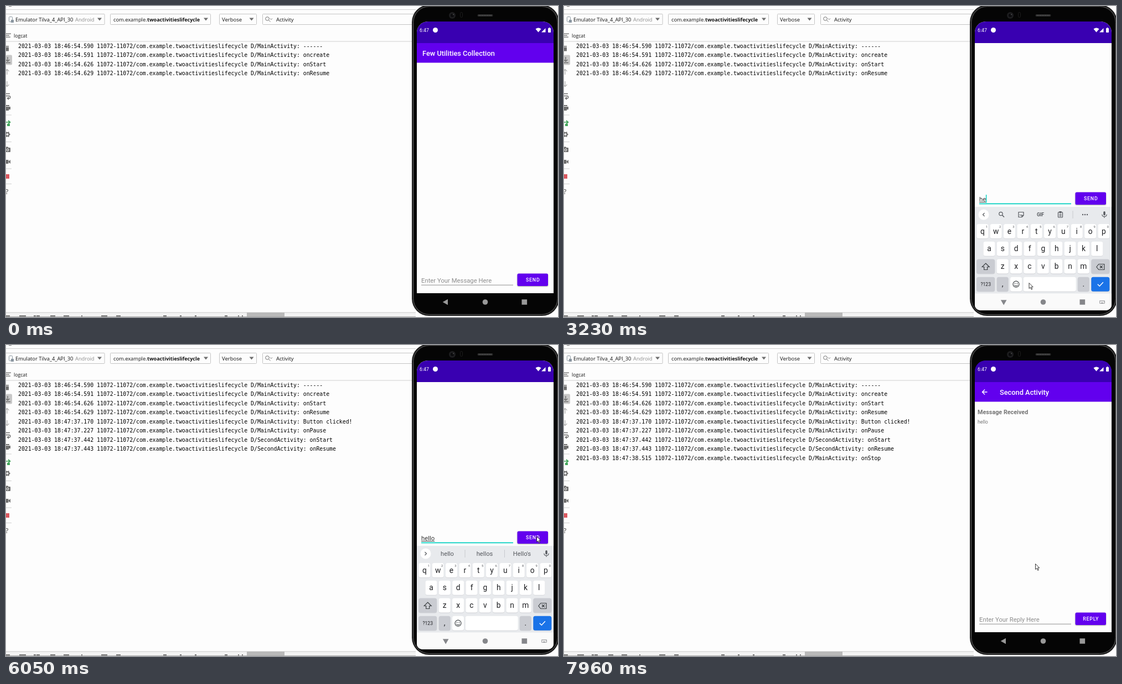
Animation, 997 px wide and 562 px high, one loop 8000 ms. Source, as an HTML page with a canvas:

```html
<!DOCTYPE html>
<html lang="en">
<head>
<meta charset="utf-8">
<title>Activity log and phone</title>
<style>
html, body { margin: 0; width: 100%; height: 100%; overflow: hidden; background: #fdfdfd; }
canvas { display: block; }
</style>
</head>
<body>
<canvas id="stage" width="997" height="562"></canvas>
<script>
const c = document.getElementById('stage').getContext('2d');
const LOOP = 8000, PI2 = Math.PI * 2;
const UI = '"Open Sans", sans-serif', MONO = '"DejaVu Sans Mono", monospace', APP = 'Roboto, sans-serif';
const PURPLE = '#6200ee', DARK = '#3900b1', TEAL = '#03d0c0', INK = '#6e6e6e';

// Value of the last step that has started: steps are [time, value].
const at = (t, first, steps) => steps.reduce((v, [s, next]) => t >= s ? next : v, first);

function rect(x, y, w, h, color, r = 0) {
  c.fillStyle = color;
  c.beginPath();
  c.roundRect(x, y, w, h, r);
  c.fill();
}
function box(x, y, w, h, color, r = 0, width = 1) {
  c.strokeStyle = color;
  c.lineWidth = width;
  c.beginPath();
  c.roundRect(x, y, w, h, r);
  c.stroke();
}
function disc(x, y, r, color) { rect(x - r, y - r, 2 * r, 2 * r, color, r); }
function ring(x, y, r, color, width = 1.2) { box(x - r, y - r, 2 * r, 2 * r, color, r, width); }
function shape(d, color, x = 0, y = 0, width = 0) {
  c.save();
  c.translate(x, y);
  const p = new Path2D(d);
  if (width) { c.strokeStyle = color; c.lineWidth = width; c.stroke(p); }
  else { c.fillStyle = color; c.fill(p); }
  c.restore();
}
function text(s, x, y, font, color = '#111', align = 'left', spacing = 0) {
  c.font = font;
  c.fillStyle = color;
  c.textAlign = align;
  c.letterSpacing = spacing + 'px';
  c.fillText(s, x, y);
  c.letterSpacing = '0px';
}
function clip(x, y, w, h, r, draw) {
  c.save();
  c.beginPath();
  c.roundRect(x, y, w, h, r);
  c.clip();
  draw();
  c.restore();
}

const LOG = [
  [0, '03-03 18:46:54.590', 'Main', '------'],
  [0, '03-03 18:46:54.591', 'Main', 'oncreate'],
  [0, '03-03 18:46:54.626', 'Main', 'onStart'],
  [0, '03-03 18:46:54.629', 'Main', 'onResume'],
  [5500, '03-03 18:47:37.170', 'Main', 'Button clicked!'],
  [5740, '03-03 18:47:37.227', 'Main', 'onPause'],
  [6050, '03-03 18:47:37.442', 'Second', 'onStart'],
  [6050, '03-03 18:47:37.443', 'Second', 'onResume'],
  [7030, '03-03 18:47:38.515', 'Main', 'onStop']
];

function desktop(t) {
  const font = '9.3px ' + UI;
  rect(0, 0, 997, 562, '#fdfdfd');
  rect(0, 6, 740, 1, '#d0d0d0');
  rect(5, 0, 5, 1, '#777');
  rect(0, 63.5, 740, 1, '#d0d0d0');
  for (const [x, w] of [[-3, 181], [188.5, 181], [385.5, 67], [463.5, 290]])
    box(x, 14.5, w, 19, '#c4c4c4', 1);
  for (const x of [169, 361, 443.5]) shape('M-4 -2H4L0 3Z', '#6e6e6e', x, 23.5);

  box(5.5, 19.5, 6, 9, '#8a96a0', 1);
  rect(9, 25, 5, 5, '#8a96a0');
  text('Emulator Tilva_4_API_30', 17, 27.5, font);
  text('Android', 125, 27.5, font, '#8c8c8c');
  text('com.example.', 194, 27.5, font);
  text('twoactivitieslifecycle', 255, 27.5, 'bold 9px ' + UI);
  text('Verbose', 390, 27.5, '9.5px ' + UI);
  ring(472, 23, 3.3, '#777', 1);
  shape('M474.5 25.5L477.5 28.5M477 22.5L479 24.5L481 22.5', '#777', 0, 0, 1);
  text('Activity', 488, 27.5, '9.5px ' + UI);
  for (const [y, w] of [[50, 9], [53, 6], [56, 8]]) rect(0, y - .5, w, 1.3, INK);
  text('logcat', 14, 57, '8.7px ' + UI);

  gutter();
  LOG.forEach(([start, stamp, name, message], i) => {
    if (t >= start) text(`2021-${stamp} 11072-11072/com.example.twoactivitieslifecycle D/${name}Activity: ${message}`,
      22, 76 + i * 16.47, '9.83px ' + MONO, '#000');
  });

  rect(0, 553.5, 740, 8.5, '#f3f3f3');
  rect(0, 553.5, 740, 1, '#c9c9c9');
  rect(435, 554, 68, 8, '#b9b9b9');
  for (const [x, w] of [[0, 7], [24, 12], [50, 4], [55, 6], [80, 9], [104, 10], [136, 2], [172, 11], [199, 8],
    [284, 6], [314, 3], [341, 3], [395, 5], [419, 2], [426, 2]]) rect(x, 559, w, 2, '#777');
  rect(0, 561, 740, 1, '#aaa');
}

function gutter() {
  rect(0, 72, 5, 1.5, INK);
  rect(0, 74.5, 5, 7, INK);
  rect(0, 88.5, 11, 18, '#c8c8c8', 2);
  shape('M3 92V100M-.5 97L3 100L6.5 97M-1 102.5H8', INK, 0, 0, 1.4);
  shape('M2 124V115M-1.5 118L2 114.5L5.5 118M2 136V145M-1.5 142L2 145.5L5.5 142', '#b5b5b5', 0, 0, 1.3);
  shape('M0 158.5H7M0 162.5H5.5C8.5 162.5 8.5 167 5.5 167H3M5 164.5L2.5 167L5 169', INK, 0, 0, 1.4);
  rect(0, 179, 6, 2, INK);
  rect(0, 182, 8, 5, INK);
  rect(0, 186, 5, 3, INK);
  for (const y of [196.5, 245, 293.5, 321]) rect(0, y, 10, 1, '#d0d0d0');
  shape('M0 210H6M4 207L7.5 210L4 213', '#42a55b', 0, 0, 1.7);
  rect(2, 213, 5, 4, '#42a55b');
  ring(2.5, 232, 3, INK, 2);
  for (let a = 0; a < 6; a++) disc(2.5 + 4.2 * Math.cos(a * PI2 / 6), 232 + 4.2 * Math.sin(a * PI2 / 6), 1, INK);
  rect(0, 256, 8, 8, INK, 1);
  rect(0, 254.5, 4, 2, INK);
  ring(3, 260, 2, '#fff', 1);
  rect(0, 278, 4.5, 7, INK);
  shape('M4 281.5L8 278V285L4 281.5', INK);
  rect(0, 304, 6, 8, '#db5860');
  text('?', -1, 340, '600 12px ' + UI, INK);
}

function phoneBody() {
  rect(733, -2, 266, 562, '#1c1c1c', 31);
  box(735.5, .5, 261, 557, '#555', 29);
  rect(737, 2, 258, 554.5, '#050505', 27);
  disc(806, 17, 6, '#1d1d1f');
  disc(806, 17, 3, '#0a0a0c');
  disc(808, 15.5, 1, '#555');
  box(820.5, 11.5, 4, 9, '#1d1d1d', 2);
  rect(851.5, 15, 28, 4, '#2c2c2c', 2);
  for (let x = 854; x < 878; x += 3) rect(x, 16, 1.5, 2, '#555');
}

function statusBar() {
  text('6:47', 747, 47, '8.8px ' + APP, '#fff');
  disc(775.5, 43.5, 4.5, '#fff');
  shape('M956.5 41.5Q961.5 37.5 966.5 41.5L961.5 47.5Z M967 47.5H974.5V40Z', '#fff');
  rect(979, 40, 5, 8, '#fff', 1);
  rect(980.5, 39, 2, 1, '#fff');
}

function appBar(title, x) {
  rect(742, 67, 247, 35.5, PURPLE);
  text(title, x, 90, '500 12.8px ' + APP, '#fff');
}

function button(label, pressed) {
  c.save();
  c.shadowColor = 'rgba(0,0,0,.35)';
  c.shadowBlur = pressed ? 4 : 2;
  c.shadowOffsetY = 1;
  rect(923.5, 483.5, 55.5, 22.5, pressed ? '#8133f1' : PURPLE, 2.5);
  c.restore();
  text(label, 951.7, 498, '500 8.8px ' + APP, '#fff', 'center', .8);
}

function field(hint, typed, focus, caret) {
  const font = '11.3px ' + APP;
  text(typed || hint, 750, 499.5, font, typed ? '#333' : '#8c8c8c');
  const w = typed ? c.measureText(typed).width : 0;
  if (typed) rect(750, 501, w, 1, '#444');
  rect(750, focus ? 503.5 : 503.8, 166, focus ? 1.7 : 1, focus ? TEAL : '#8f8f8f');
  if (caret) rect(749.7 + w, 488, 1.4, 14.5, TEAL);
}

function mainScreen(t) {
  const pan = at(t, 0, [[2400, 18], [2520, 147]]);
  const typed = at(t, '', [[3230, 'he'], [3380, 'hel'], [3770, 'hell'], [3890, 'hello']]);
  const caret = at(t, 0, [[1700, 1], [2250, 0], [2790, 1], [4440, 0], [4950, 1], [5380, 0]]);
  rect(742, 28, 247, 491, '#fdfdfd');
  clip(742, 67, 247, 452, 0, () => {
    c.translate(0, -pan);
    appBar('Few Utilities Collection', 752);
    field('Enter Your Message Here', typed, t >= 1580, caret);
    button('SEND', t >= 5500 && t < 5740);
  });
  rect(742, 28, 247, 39, DARK);
}

function secondScreen() {
  rect(742, 28, 247, 39, DARK);
  rect(742, 67, 247, 452, '#fdfdfd');
  appBar('Second Activity', 787);
  shape('M764.5 85H755.5M760 80.5L755.5 85L760 89.5', '#fff', 0, 0, 1.4);
  text('Message Received', 747, 125, 'bold 10.8px ' + APP, '#757575');
  text('hello', 747, 142.3, '8.8px ' + APP, '#757575');
  field('Enter Your Reply Here');
  button('REPLY');
}

function key(x, y, label, w = 21, color = '#fff', size = 13.8) {
  rect(x - w / 2, y - 12.2, w, 26, '#cfd1d5', 3.5);
  rect(x - w / 2, y - 13, w, 26, color, 3.5);
  text(label, x, y + size * .33, size + 'px ' + APP, '#202124', 'center');
}

function toolbar(words) {
  const g = '#55585d';
  disc(758, 377, 9.5, '#fff');
  shape(words ? 'M-1.5 -3L1.5 0L-1.5 3' : 'M1.5 -3L-1.5 0L1.5 3', g, 758, 377, 1.2);
  rect(974.3, 371, 3.4, 7.5, g, 1.7);
  shape('M971.8 376.5C972 382 980 382 980.2 376.5M976 380.5V383', g, 0, 0, 1.1);
  if (words) {
    words.forEach((s, i) => text(s, 797 + i * 67.5, 381, '11.2px ' + APP, g, 'center'));
    rect(828.5, 370, 1, 14, '#c8cace');
    rect(900, 370, 1, 14, '#c8cace');
    return;
  }
  ring(789, 375.5, 3.2, g);
  shape('M791.5 378L795 381.5', g, 0, 0, 1.4);
  shape('M821 372.5H830V378.5L827 381.5H821ZM827 381.5V378.5H830M823 377Q825 379.5 827 377', g, 0, 0, 1.2);
  text('GIF', 860.5, 380, 'bold 8.6px ' + APP, g, 'center');
  box(892.5, 372.5, 8, 9.5, g, 1, 1.2);
  rect(894.5, 371, 4, 3, g);
  for (const y of [376, 378, 380]) rect(894.5, y - .5, 4, .9, g);
  rect(918.5, 370, 1, 14, '#c8cace');
  for (const x of [937, 941, 945]) disc(x, 377, 1.2, g);
}

function keyboard(t, drop) {
  const gray = '#caccd2', step = 24.35;
  c.save();
  c.translate(0, drop);
  rect(742, 363, 247, 190, '#e8eaed');
  toolbar(at(t, null, [[3620, ['hel', 'held', 'Help']], [4010, ['hello', 'hellos', 'Hello\'s']]]));
  [...'qwertyuiop'].forEach((s, i) => {
    key(755.8 + i * step, 407, s);
    text((i + 1) % 10, 763.3 + i * step, 401, '5.8px ' + APP, '#55585d', 'center');
  });
  [...'asdfghjkl'].forEach((s, i) => key(768 + i * step, 438.7, s));
  [...'zxcvbnm'].forEach((s, i) => key(792.2 + i * step, 470.6, s));
  key(761.7, 470.6, '', 33, gray);
  shape('M0 -6L6.5 .5H3V5.5H-3V.5H-6.5Z', '#3c4043', 761.7, 471, 1.2);
  key(968.8, 470.6, '', 33, gray);
  shape('M-7 0L-3 -5H7V5H-3ZM-1 -2.5L4 2.5M4 -2.5L-1 2.5', '#3c4043', 968.8, 471.5, 1.2);
  key(761.7, 502.7, '?123', 33, gray, 8.6);
  key(792.2, 502.7, ',', 21, gray);
  key(816.5, 502.7, '');
  ring(816.5, 502.7, 5.5, '#3c4043');
  disc(814.5, 501.3, .9, '#3c4043');
  disc(818.5, 501.3, .9, '#3c4043');
  shape('M813.5 504Q816.5 508 819.5 504', '#3c4043', 0, 0, 1.1);
  key(877.3, 502.7, '', 95);
  key(938.3, 502.7, '.', 21, gray);
  key(968.8, 502.7, '', 33, '#1a73e8');
  shape('M-5 0L-1.5 3.5L5 -3.5', '#fff', 968.8, 502.7, 1.5);
  c.restore();
}

function navBar(t, light) {
  const color = light ? '#85868a' : '#999';
  const turn = at(t, 0, [[2400, -15], [2520, -50], [2670, -75], [2790, -90],
    [6360, -80], [6480, -67], [6600, -30], [6750, 0]]);
  c.save();
  c.globalAlpha = t >= 2400 && t < 2520 ? .5 : 1;
  c.save();
  c.translate(794.2, 535);
  c.rotate(turn * Math.PI / 180);
  shape('M-5.5 0L3.8 -5.3V5.3Z', color);
  c.restore();
  disc(865.5, 535, 4.8, color);
  rect(931.5, 530.2, 9.6, 9.6, color);
  if (t >= 1850 && t < 6360) {
    box(967.5, 532.5, 9, 5, color, .5, .8);
    for (let x = 969; x < 976; x += 2) rect(x, 534, 1, 1, color);
    rect(970, 536, 4, .8, color);
  }
  c.restore();
}

function screen(t) {
  const open = t >= 2250 && t < 6360;
  if (t < 6480) mainScreen(t);
  else if (t < 6600) rect(742, 57, 247, 420, '#c4c4c4');
  if (open) {
    keyboard(t, at(t, 110, [[2400, 30], [2520, 0]]));
    if (t >= 2520) rect(742, 519.5, 247, 31, '#fafafa');
  }
  if (t >= 6360) {
    const scale = at(t, .94, [[6480, .985], [6600, .996], [6750, 1]]);
    c.save();
    c.globalAlpha = t < 6480 ? .7 : 1;
    c.translate(865.5, 290);
    c.scale(scale, scale);
    c.translate(-865.5, -290);
    secondScreen();
    c.restore();
    rect(742, 28, 247, 29, DARK);
  }
  statusBar();
  navBar(t, open);
}

function pointer(t) {
  const p = at(t, null, [[840, [864.5, 530]], [1000, [845.5, 515]], [1150, [840.5, 501]], [1300, [840, 500.5]],
    [4290, [856, 467]], [4440, [912, 345]], [4560, [945, 297]], [4690, [963, 326]], [4830, [962, 336]],
    [4950, [958.5, 342.5]], [5110, [958.5, 346]], [7810, [913.5, 350.5]], [7960, [851.5, 395.5]]]);
  if (!p) return;
  const arrow = 'M0 0V10L2.4 7.9L4.2 11.8L5.8 11.1L4.1 7.3H7.2Z';
  shape(arrow, '#fff', ...p);
  shape(arrow, '#222', ...p, .9);
}

function frame(now) {
  const t = now % LOOP;
  desktop(t);
  phoneBody();
  clip(742, 28, 247, 522, [20, 20, 10, 10], () => screen(t));
  pointer(t);
  requestAnimationFrame(frame);
}
requestAnimationFrame(frame);
</script>
</body>
</html>
```
